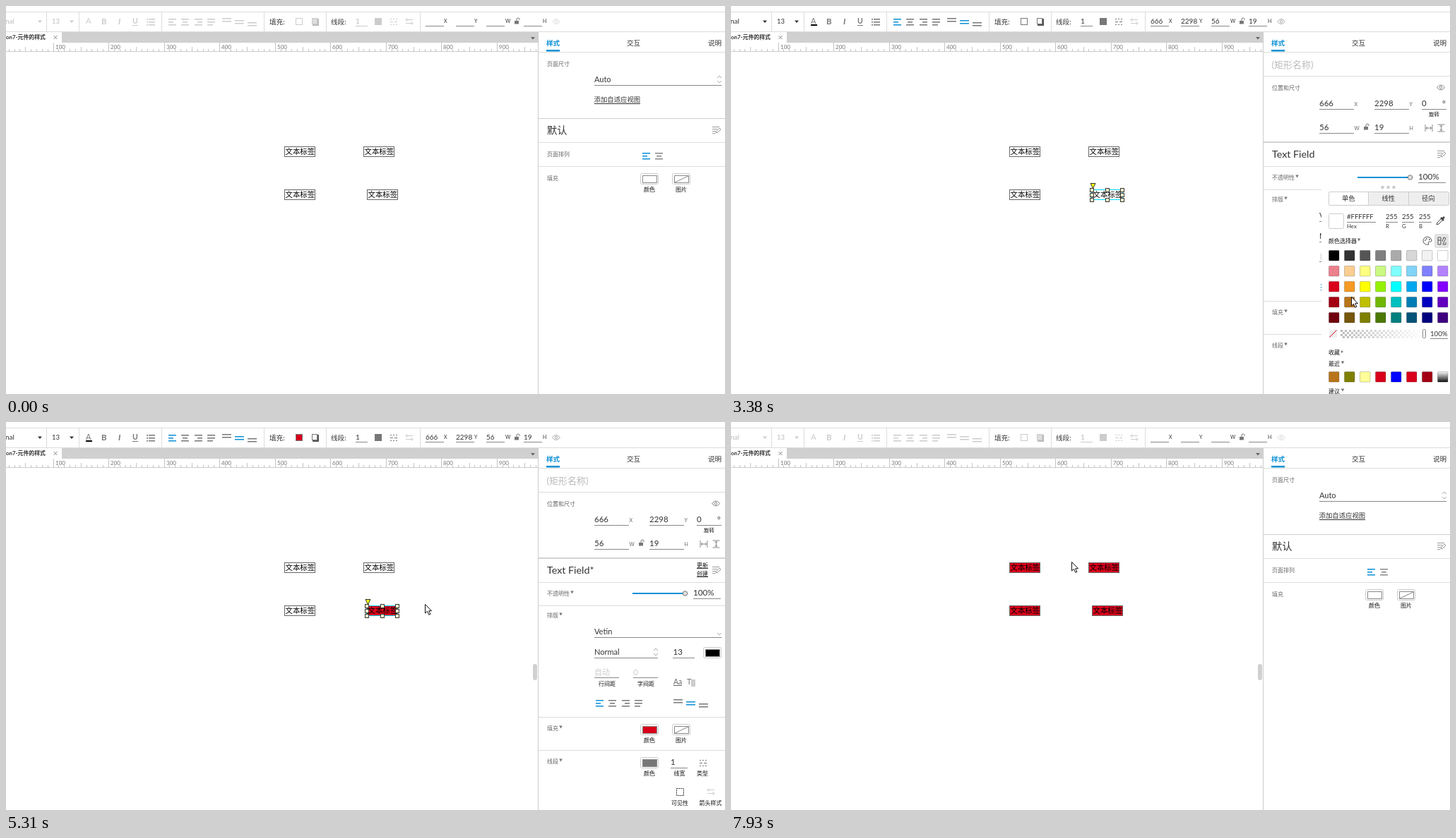
An HTML page with a canvas that plays this animation: 1018x550 px, repeating every 8 s.

```html
<!DOCTYPE html>
<html lang="zh">
<head>
<meta charset="utf-8">
<style>
html, body { margin: 0; width: 100%; height: 100%; overflow: hidden; background: #fff }
canvas { display: block }
</style>
</head>
<body>
<canvas id="stage" width="1018" height="550"></canvas>
<script>
const ctx = document.getElementById('stage').getContext('2d');
const LOOP = 8000;
const BLUE = '#0a90d6', RED = '#d9001b', DARK = '#333', MID = '#777', PALE = '#ccc', RULE = '#dcdcdc';
const CYAN = '#00d8ee', CAPTION = '#111';
const LABELS = [[394, 199], [506, 199], [394, 260], [511, 260]];
const PALETTE = [
  '#000 #333 #555 #7f7f7f #aaa #d7d7d7 #f2f2f2 #fff',
  '#ec808d #facd91 #ffff80 #caf982 #80ffff #81d3f8 #8080ff #b482ff',
  '#d9001b #f59a23 #ffff00 #95f204 #00ffff #02a7f0 #0000ff #8400ff',
  '#a30014 #b8741a #bfbf00 #70b603 #00bfbf #027db4 #0000bf #6300bf',
  '#70000d #75560b #7f7f00 #4b7902 #007f7f #015478 #00007f #3f007f'
].map(row => row.split(' '));
const RECENT = '#b8741a #7f7f00 #ffff99 #d9001b #0000ff #d9001b #a30014'.split(' ');

// Pointer moves: first step, last step, number of steps, destination
const MOVES = [
  [300, 940, 9, 527, 256], [1120, 1190, 2, 527, 262], [1260, 1340, 2, 533, 265],
  [1480, 1960, 7, 867, 443], [2190, 2350, 3, 901, 443], [2500, 2580, 2, 914, 436],
  [2990, 3550, 8, 862, 401], [3700, 3700, 1, 858, 400], [3920, 4300, 6, 569, 319],
  [4380, 4540, 3, 557, 303], [4680, 4860, 4, 537, 265], [5170, 5880, 9, 977, 212],
  [5960, 5960, 1, 985, 212], [6350, 6520, 3, 988, 203], [6980, 7700, 10, 482, 198]
];

function pointerAt(t) {
  let x = 900, y = 548;
  for (const [start, end, steps, tx, ty] of MOVES) {
    if (t < start) break;
    const gap = (end - start) / (steps - 1) || 1;
    const p = Math.min(1, (Math.floor((t - start) / gap + 1e-6) + 1) / steps);
    const e = p * p * (3 - 2 * p);
    x += (tx - x) * e;
    y += (ty - y) * e;
  }
  return [Math.round(x), Math.round(y)];
}

function box(x, y, w, h, fill, stroke) {
  if (fill) { ctx.fillStyle = fill; ctx.fillRect(x, y, w, h); }
  if (stroke) { ctx.lineWidth = 1; ctx.strokeStyle = stroke; ctx.strokeRect(x + .5, y + .5, w - 1, h - 1); }
}
function round(x, y, w, h, r, fill, stroke) {
  ctx.beginPath();
  ctx.roundRect(x, y, w, h, r);
  if (fill) { ctx.fillStyle = fill; ctx.fill(); }
  if (stroke) { ctx.lineWidth = 1; ctx.strokeStyle = stroke; ctx.stroke(); }
}
function path(d, x, y, stroke, fill, width = 1) {
  ctx.save();
  ctx.translate(x, y);
  const shape = new Path2D(d);
  if (fill) { ctx.fillStyle = fill; ctx.fill(shape); }
  if (stroke) { ctx.lineWidth = width; ctx.strokeStyle = stroke; ctx.stroke(shape); }
  ctx.restore();
}
function disc(x, y, r, fill, stroke) {
  round(x - r, y - r, 2 * r, 2 * r, r, fill, stroke);
}
// y is the visual middle of the line
function text(s, x, y, size = 8, color = DARK, style = '') {
  ctx.font = `${style} ${size}px Lato, "Noto Sans CJK SC", "Noto Sans CJK", sans-serif`;
  ctx.fillStyle = color;
  ctx.fillText(s, x, y + size * .37);
}
const caption = (s, x, y, size = 8) => text(s, x, y, size, CAPTION);
const hline = (x, x2, y, color = '#888') => box(x, y, x2 - x, 1, color);
const divider = (y, color = RULE) => hline(754, 1018, y, color);
const caret = (x, y, color = MID) => path('M-3-1.5H3L0 2Z', x, y, null, color);
const foldMark = (x, y) => path('M-2.3-2H2.3L0 2Z', x, y - 1.5, null, MID);

function heading(s, y, folds) {
  text(s, 766, y, 8, '#666');
  if (folds) foldMark(769.5 + s.length * 8, y);
}
function alignIcon(x, y, kind, color) {
  const widths = kind === 3 ? [11, 11, 8] : [11, 7, 11];
  widths.forEach((w, i) => box(x - 5 + (kind === 3 ? 0 : (11 - w) * kind / 2), y - 4 + i * 4, w, 1.5, color));
}
function alignIcons(xs, y, first, color) {
  xs.forEach((x, i) => alignIcon(x, y, i, i ? color : first));
}
function valignIcons(x, y, active, color) {
  for (let i = 0; i < 3; i++)
    for (const dy of [-5, -1])
      box(x + i * 18 - 6, y + dy + i * 3, 13, 1.5, i === 1 ? active : color);
}
function dashes(x, y, color) {
  [2, 4, 2].forEach((w, i) => {
    for (let dx = -5; dx < 6; dx += w + 2) box(x + dx, y - 4 + i * 4, w, 1, color);
  });
}
const arrows = (x, y, color) => path('M-5-2.5H5M-2.5-5L-5-2.5L-2.5 0M-5 2.5H5M2.5 0L5 2.5L2.5 5', x, y, color);
function eye(x, y, color) {
  path('M-5.5 0Q0-7 5.5 0Q0 7-5.5 0Z', x, y, color);
  disc(x, y, 1.7, null, color);
}
function lock(x, y) {
  path('M-1 0V-2A2 2 0 0 1 3-2V-1', x, y, MID);
  box(x - 4, y, 6, 4.5, MID);
}
const spinner = (x, y) => path('M-3-2L0-5L3-2M-3 2L0 5L3 2', x, y, '#aaa');
const editIcon = (x, y) => path('M-5-4.5H5M-5-1.5H2M-5 1.5H0M-5 4.5H-1M0 4L1 1L5-3L7-1L3 3Z', x, y, '#999');
function swatch(x, y, fill, slashed) {
  round(x - 12.5, y - 7.5, 25, 15, 2, '#fff', PALE);
  box(x - 10, y - 5, 21, 11, fill, '#888');
  if (slashed) path('M-9 5L10-4', x, y, '#888');
}
function fillRow(y, fill) {
  swatch(911, y, fill);
  swatch(956, y, '#fff', true);
  caption('颜色', 903, y + 15);
  caption('图片', 948, y + 15);
}

function drawToolbar(on, fill) {
  const ink = on ? DARK : PALE, icon = on ? MID : PALE, active = on ? BLUE : PALE;
  hline(0, 1018, 8, RULE);
  hline(0, 1018, 36, RULE);
  for (const x of [57, 103, 220, 365, 453, 586]) box(x, 9, 1, 27, RULE);
  text('nal', -1, 21, 10, on ? DARK : '#bbb');
  caret(48, 22, ink);
  text('13', 65, 21, 9.5, on ? DARK : '#bbb');
  caret(93, 22, ink);
  text('A', 113, 20.5, 11, icon);
  box(113, 26, 9, 2, on ? '#000' : '#fff');
  text('B', 135, 21.5, 11.5, icon, 'bold');
  text('I', 159, 21.5, 12, icon, 'italic bold');
  text('U', 179, 21, 10.5, icon, 'bold');
  hline(179, 187, 27, icon);
  for (let y = 18; y < 27; y += 4) { box(199, y, 2, 1.5, icon); box(202, y, 9, 1.5, icon); }
  alignIcons([235, 253, 272, 290], 22, active, icon);
  valignIcons(312, 22, active, icon);
  text('填充:', 373, 22, 9.6);
  box(410, 17, 10, 10, fill, on ? MID : PALE);
  box(434, 18, 9, 10, on ? '#555' : '#bbb');
  box(433, 17, 8, 9, on ? '#fff' : '#ddd', icon);
  text('线段:', 460, 22, 9.6);
  text('1', 495, 21, 10, on ? DARK : '#bbb');
  hline(495, 512, 28, on ? '#888' : PALE);
  box(522, 17, 10, 10, on ? '#777' : PALE);
  dashes(549, 22, icon);
  arrows(571, 22, PALE);
  [[594, '666', 'X', 620], [637, '2298', 'Y', 663], [680, '56', 'W', 707], [733, '19', 'H', 760]]
    .forEach(([x, value, name, nx]) => {
      if (on) text(value, x, 21, 10);
      hline(x, x + 26, 28);
      text(name, nx, 21.5, 7);
    });
  lock(724, 21);
  eye(779, 22, on ? '#aaa' : '#ddd');
}

function drawRuler() {
  box(0, 37, 754, 15, '#d0d0d0');
  box(0, 37, 79, 15, '#fff');
  text('on7-元件的样式', 0, 44, 7.9, DARK, 'bold');
  path('M-2.5-2.5L2.5 2.5M2.5-2.5L-2.5 2.5', 70, 44.5, '#888');
  caret(746, 45.5, '#666');
  hline(0, 754, 64, PALE);
  for (let unit = 20; unit < 980; unit += 10) {
    const x = Math.round(66.5 + (unit - 100) * .7855);
    if (x < 0 || x > 753) continue;
    const top = unit % 100 === 0 ? 52 : unit % 50 === 0 ? 58 : 61;
    box(x, top, 1, 65 - top, '#c4c4c4');
    if (unit % 100 === 0) text(unit, x + 3, 58, 8, '#777');
  }
}

function drawLabels(red, allRed, selected, hovered) {
  LABELS.forEach(([x, y], i) => {
    const last = i === 3;
    box(x, y, 44, 15, allRed || last && red ? RED : '#fff', '#666');
    text('文本标签', x + 1.5, y + 7, 10.4, '#000');
    if (last && (hovered || selected)) box(x - 1, y, 45, 15, null, CYAN);
  });
  if (!selected) return;
  for (const x of [511, 533, 554])
    for (const y of [261, 268, 275])
      if (x !== 533 || y !== 268) box(x - 3, y - 3, 6, 6, '#fff6cc', '#333');
  path('M-3.5-3.5H3.5L0 3.5Z', 512.5, 255, '#333', '#ff0');
}

function drawPanelTabs() {
  box(754, 37, 264, 513, '#fff');
  box(753, 37, 1, 513, PALE);
  text('样式', 765, 52, 9.6, BLUE, 'bold');
  text('交互', 879, 52, 9.6);
  text('说明', 994, 52, 9.6);
  divider(65);
  box(765, 62, 19, 2.5, BLUE);
}

function drawPagePanel() {
  heading('页面尺寸', 82);
  text('Auto', 833, 104, 11);
  hline(833, 1013, 112);
  spinner(1010, 104);
  text('添加自适应视图', 832.5, 133, 9.4);
  hline(833, 898, 138, DARK);
  divider(159, PALE);
  text('默认', 766, 176, 14.2);
  editIcon(1005, 176);
  divider(193);
  heading('页面排列', 210);
  alignIcon(906, 212, 0, BLUE);
  alignIcon(924, 212, 1, '#888');
  divider(227);
  heading('填充', 244);
  fillRow(245, '#fff');
}

function drawWidgetPanel(fill, dirty, hot) {
  text('(矩形名称)', 765.5, 83, 13, '#bbb');
  divider(99);
  heading('位置和尺寸', 116);
  eye(1005, 115.5, '#888');
  [[833, 138, '666', 'X'], [911, 138, '2298', 'Y'], [833, 172, '56', 'W'], [911, 172, '19', 'H']]
    .forEach(([x, y, value, name]) => {
      text(value, x, y, 11.5);
      hline(x, x + 49, y + 8);
      text(name, x + 49.5, y + 1, 7, '#666');
    });
  text('0', 978, 138, 11.5);
  text('°', 1007, 139, 11.5);
  hline(978, 1013, 146);
  caption('旋转', 988, 153.5, 7.4);
  lock(900, 171);
  path('M-5-5V5M5-5V5M-4 0H4M-2-2L-4 0L-2 2M2-2L4 0L2 2', 988, 173, '#888');
  path('M-5-5H5M-5 5H5M0-4V4M-2-2L0-4L2-2M-2 2L0 4L2 2', 1005.5, 173, '#888');
  box(754, 192, 264, 2, '#d4d4d4');
  text(dirty ? 'Text Field*' : 'Text Field', 766, 210, 14.3);
  editIcon(1005, 210);
  if (dirty) {
    text('更新', 978, 203, 8, hot ? BLUE : CAPTION, hot ? 'bold' : '');
    hline(978, 994, 207, hot ? BLUE : DARK);
    caption('创建', 978, 215);
    hline(978, 994, 219, DARK);
  }
  divider(227);
  heading('不透明性', 243, true);
  box(887, 242, 72, 2, BLUE);
  disc(961.5, 243, 3.3, '#ddd', '#777');
  text('100%', 973, 242, 11.7);
  hline(973, 1012, 250);
  divider(260);

  heading('排版', 274, true);
  text('Vetin', 833, 297, 11);
  hline(833, 1013, 305);
  path('M-3-1L0 2L3-1', 1010, 300, '#aaa');
  text('Normal', 833, 326, 11);
  hline(833, 923, 334);
  spinner(920, 326);
  text('13', 944.5, 326, 11.5);
  hline(944, 975, 334);
  swatch(1000, 327, '#000');
  text('自动', 833, 355, 11, PALE);
  text('0', 888, 355, 11.5, PALE);
  hline(833, 868, 362);
  hline(888, 923, 362);
  caption('行间距', 839, 371);
  caption('字间距', 894, 371);
  text('Aa', 945, 368, 10.5, '#666');
  hline(945, 957, 373, '#666');
  box(970, 365, 6, 10, PALE);
  text('T', 964, 368, 11, MID);
  alignIcons([840, 858, 877, 895], 398, BLUE, MID);
  valignIcons(951, 398, BLUE, MID);
  divider(418);

  heading('填充', 434, true);
  fillRow(436, fill);
  divider(465);
  heading('线段', 481, true);
  swatch(911, 483, '#777');
  text('1', 941, 482, 11.5);
  hline(941, 965, 490);
  dashes(987, 483, MID);
  caption('颜色', 903, 498);
  caption('线宽', 945.5, 498);
  caption('类型', 978, 498);
  ctx.setLineDash([2, 1]);
  box(949, 519, 11, 11, null, '#333');
  ctx.setLineDash([]);
  arrows(998, 524, PALE);
  caption('可见性', 942, 540);
  caption('箭头样式', 981.5, 540);
}

function chip(i, y, color) {
  round(846.5 + i * 22, y - 7.5, 14.5, 14.5, 1, color, 'rgba(0,0,0,.2)');
}
function drawPicker(red) {
  const color = red ? RED : '#fff';
  box(836, 253, 182, 297, '#fff');
  for (let i = 0; i < 3; i++) disc(922.5 + i * 8, 257, 2.3, PALE);
  round(846.5, 263.5, 170, 19, 2, '#eee', PALE);
  round(846.5, 263.5, 56, 19, 2, '#fff', PALE);
  box(959, 264, 1, 19, PALE);
  ['单色', '线性', '径向'].forEach((s, i) => text(s, 865 + i * 56.5, 273, 9.3));
  round(846.5, 294.5, 21, 21, 2, color, PALE);
  const values = red ? ['#D9001B', '217', '0', '27'] : ['#FFFFFF', '255', '255', '255'];
  [[872, 41, 'Hex'], [927, 17, 'R'], [950, 17, 'G'], [974, 18, 'B']].forEach(([x, w, name], i) => {
    text(values[i], x, 298, 9.5);
    hline(x, x + w, 306);
    text(name, x, 312.5, 7.8);
  });
  path('M-6 6L-5 3L1-3L3-1L-3 5Z', 1005, 304, '#444');
  path('M0-4L4 0M2-2L5-5', 1005, 304, '#444', null, 2.5);
  caption('颜色选择器', 846, 333);
  foldMark(889, 333);
  round(996.5, 323.5, 19, 19, 2, '#e4e4e4', '#ddd');
  path('M2 5A6 5.5 0 1 1 6 0Q5 2 2 1Q0 2 2 5Z', 986, 333, '#555');
  for (const [x, y] of [[983, 332], [985, 330], [989, 331]]) disc(x, y, .9, '#555');
  path('M-5-5H-1V5H-5ZM-5-1H-1M1 1L3-5L6-4L2 5H6V2', 1006, 333, '#555');
  PALETTE.forEach((row, j) => row.forEach((c, i) => chip(i, 354 + j * 22, c)));

  box(847, 459, 11, 11, '#eee');
  path('M-5 5L5-5', 852.5, 464.5, RED);
  for (let x = 0; x < 40; x++)
    for (let y = 0; y < 4; y++) box(863 + x * 3, 459 + y * 3, 3, 3, (x + y) % 2 ? '#fff' : '#bbb');
  const fade = ctx.createLinearGradient(863, 0, 983, 0);
  fade.addColorStop(0, red ? 'rgba(217,0,27,0)' : 'rgba(255,255,255,0)');
  fade.addColorStop(1, color);
  box(863, 459, 120, 12, fade);
  round(979.5, 458.5, 4, 12, 1, '#fff', red ? RED : '#888');
  text('100%', 990, 464, 9.7);
  hline(990, 1015, 471);
  caption('收藏', 846, 491);
  path('M-1-2L2 0L-1 2Z', 865, 490, null, MID);
  caption('最近', 846, 507);
  foldMark(866, 507);
  RECENT.forEach((c, i) => chip(i, 526, c));
  const shade = ctx.createLinearGradient(0, 518, 0, 534);
  shade.addColorStop(0, '#fff');
  shade.addColorStop(1, '#000');
  chip(7, 526, shade);
  caption('建议', 846, 546);
  foldMark(866, 546);
}

function drawPointer(x, y, hand) {
  if (hand)
    path('M-1 1Q0-1 1 1V6L6 7Q7.5 8 7 10L5.5 15H-1L-4 10Q-4 8-2 9L-1 10ZM3 7V9M5 7V9', x + .5, y, '#000', '#fff');
  else
    path('M0 0V12.5L3 9.8L5.2 14.8L7.4 13.8L5.2 9.2H9Z', x + .5, y + .5, '#111', '#fff');
}

function draw(t) {
  const within = (a, b) => t >= a && t < b;
  const selected = within(1120, 4460) || within(5080, 7830);
  const red = t >= 3840, updated = t >= 6900;
  const fill = red ? RED : '#fff';
  const [x, y] = pointerAt(t);
  const hovered = x > 505 && x < 555 && y > 250 && y < 275;

  box(0, 0, 1018, 550, '#fff');
  drawToolbar(selected, selected ? fill : '#fff');
  drawRuler();
  drawLabels(red, updated, selected, hovered);
  if (t >= 300 && x < 754) round(746, 343, 6, 23, 3, '#d0d0d0');
  drawPanelTabs();
  if (selected) drawWidgetPanel(fill, red && !updated, within(6430, 6900));
  else drawPagePanel();
  if (within(2760, 4460)) drawPicker(red);
  if (within(2580, 2760) || within(3840, 3920) || within(6900, 6980)) disc(x - 1, y + 1, 9.5, 'rgba(255,250,0,.68)');
  if (within(1120, 1480)) box(x + 5, y + 13, 4, 4, '#000');
  if (t >= 300) drawPointer(x, y, within(5960, 6980));
}

function tick() {
  draw(performance.now() % LOOP);
  requestAnimationFrame(tick);
}
tick();
</script>
</body>
</html>
```
